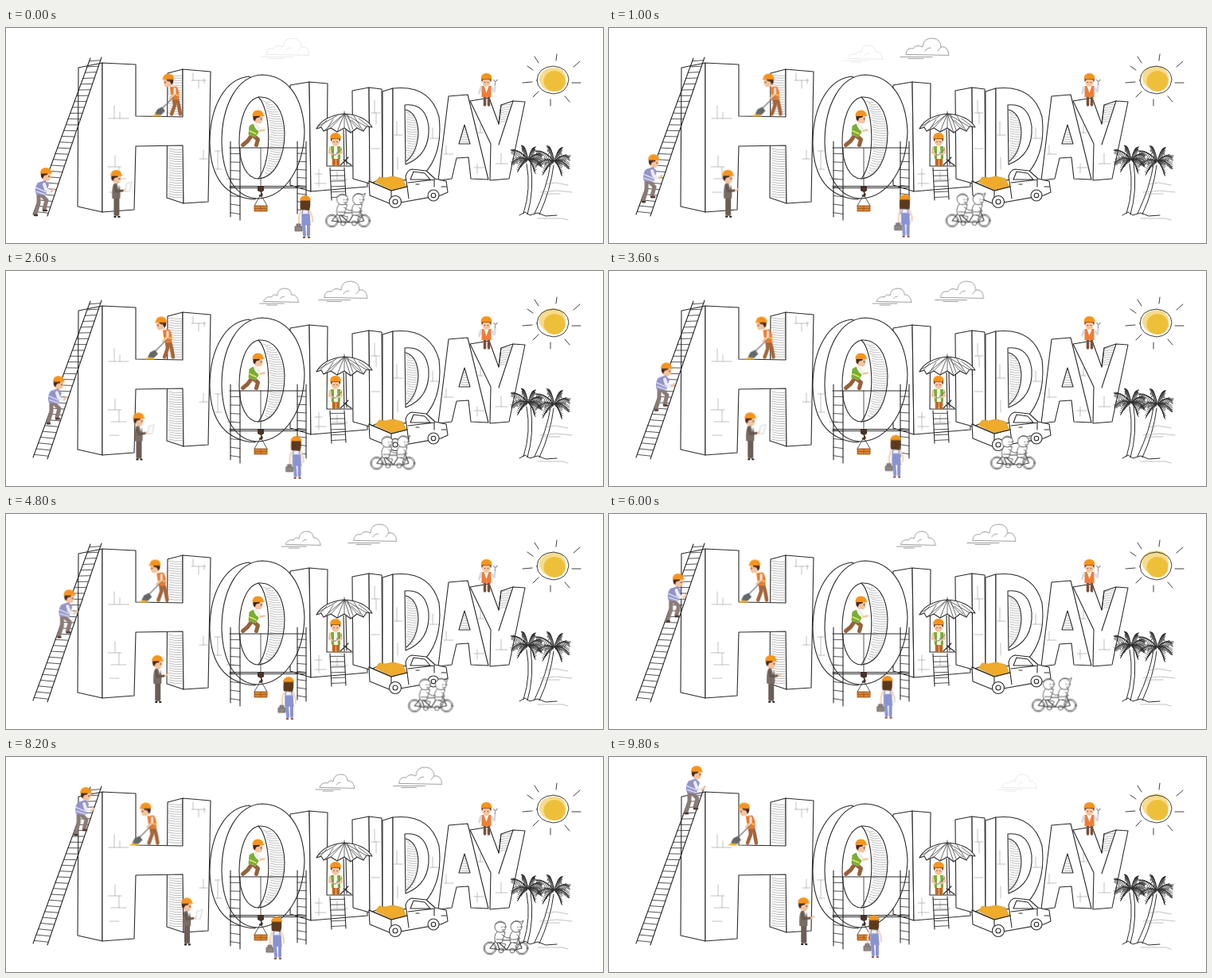
These frames come from a looping animation (750 px wide and 271 px high, 10000 ms). An HTML page:

```html
<!DOCTYPE html>
<html lang="en">
<head>
<meta charset="utf-8">
<title>Holiday</title>
<style>
html, body { margin: 0; width: 100%; height: 100%; overflow: hidden; background: #fff; }
svg { display: block; width: 100vw; height: 100vh; }
.ink { fill: none; stroke: #2b2b2b; stroke-width: 1.1; stroke-linecap: round; stroke-linejoin: round; }
.face { fill: #fff; }
.thin { stroke: #888; stroke-width: .55; }
.brick { stroke: #999; stroke-width: .6; }
.sketch { stroke: #444; stroke-width: .8; }
.cloud { stroke: #777; stroke-width: .7; }
.limb { fill: none; stroke-linecap: round; stroke-linejoin: round; }
.move { animation: 10s infinite; }
#climber { animation-name: climb; animation-timing-function: steps(50); }
#digger { animation-name: dig; animation-timing-function: steps(50); }
#planner { animation-name: plan; animation-timing-function: steps(50); }
#fitter { animation-name: fit; animation-timing-function: steps(50); }
#paper { animation-name: paper; animation-timing-function: step-end; }
#glow { animation-name: glow; animation-timing-function: steps(10); }
#bike { animation-name: ride; }
#cloudA { animation-name: driftA; }
#cloudB { animation-name: driftB; }
@keyframes climb { from { transform: translate(50px, 181px); } to { transform: translate(111.2px, 12.8px); } }
@keyframes dig { from { transform: translate(204px, 62.5px); } to { transform: translate(169.3px, 62.5px); } }
@keyframes plan { from { transform: translate(138.4px, 184px); } to { transform: translate(246.4px, 182px); } }
@keyframes fit { from { transform: translate(376px, 215px); } to { transform: translate(332px, 203px); } }
@keyframes paper { 0%, 26%, 66% { opacity: 1; } 6%, 46%, 86%, 100% { opacity: 0; } }
@keyframes glow {
  0%, 40%, 80% { transform: translate(687px, 65px); }
  20%, 60%, 100% { transform: translate(686px, 61px); }
}
@keyframes ride {
  0% { transform: translate(429.5px, 252px); animation-timing-function: steps(35); }
  70% { transform: translate(581px, 250px); animation-timing-function: steps(6); }
  82% { transform: translate(628px, 250px); opacity: 1; animation-timing-function: steps(5); }
  92%, 100% { transform: translate(668px, 249px); opacity: 0; }
}
@keyframes driftA {
  0% { transform: translate(354px, 0); opacity: .22; animation-timing-function: steps(5); }
  10% { transform: translate(400px, 0); opacity: 1; animation-timing-function: steps(37); }
  84% { transform: translate(524px, 0); opacity: 1; animation-timing-function: steps(6); }
  96%, 100% { transform: translate(600px, 0); opacity: 0; }
}
@keyframes driftB {
  0% { transform: translate(303px, 0); opacity: 0; animation-timing-function: steps(5); }
  10% { transform: translate(322px, 0); opacity: .22; animation-timing-function: steps(5); }
  20% { transform: translate(338px, 0); opacity: 1; animation-timing-function: steps(31); }
  82% { transform: translate(416px, 0); opacity: 1; animation-timing-function: steps(8); }
  98% { transform: translate(515px, 0); opacity: .22; }
  100% { transform: translate(524px, 0); opacity: 0; }
}
</style>
</head>
<body>
<svg viewBox="0 0 750 271" preserveAspectRatio="none">
  <defs>
    <path id="helmet" d="M-7 2.500Q-7-5 0-5 6-5 7 1L8.500 2.500Z" fill="#f7941d"/>
    <g id="head">
      <path d="M-5 1Q-6 8-3 11L3 12Q7 9 6 2Z" fill="#f6c39c"/>
      <path d="M-6 1Q-7 7-4 9L-2 5 2 4 3 1Z" fill="#4a2a1c"/>
      <path d="M4 5V7" stroke="#4a2a1c" stroke-width="1"/>
      <use href="#helmet"/>
    </g>
    <g id="front">
      <path d="M-6 1Q-6 11 0 12 6 11 6 1Z" fill="#f6c39c"/>
      <path d="M-6 1V6L-4 3H4L6 6V1Z" fill="#4a2a1c"/>
      <path d="M-2 6V7M2 6V7" stroke="#4a2a1c" stroke-width="1"/>
      <path d="M-7 2.500Q-7-5 0-5 7-5 7 2.500Z" fill="#f7941d"/>
    </g>
  </defs>

  <!-- clouds -->
  <path id="cloudA" class="move ink cloud" d="M-27 33Q-26 24-18 26-14 20-6 24-5 12 7 13 17 14 17 24 26 22 27 34ZM-34 36.500H6M-24 38.500H-5M-3 29Q-1 25 4 25M13 29L17 24"/>
  <path id="cloudB" class="move ink cloud" d="M-22 38Q-19 31-12 33-10 28-5 31-4 21 6 22 13 23 13 30 20 29 22 39ZM-27 41H4M-18 43H-5M-1 35Q1 32 4 32"/>

  <!-- sun -->
  <path id="glow" class="move" d="M-17-1Q-15-14 1-15 16-15 17 1 16 15 2 15-15 15-17-1Z" fill="#f6dc8d"/>
  <ellipse cx="689" cy="67" rx="13.500" ry="13" fill="#eec03a"/>
  <path class="ink" style="stroke-width:.9" d="M667 66Q668 49 688 48 706 50 707 65 705 82 688 83 668 81 667 66ZM692 33L691 41M721 42L713 49M664 36L669 44M655 48L662 53M711 69H722M649 69L661 68M662 87L669 80M684 90V98M702 86L708 93"/>

  <!-- letters -->
  <g class="ink">
    <path class="face" d="M222 52L203 57 202 214 223 221Z"/>
    <path class="face" d="M91 50L121 44 121 232 90 225Z"/>
    <path class="face" d="M121 44L163 46 163 111 222 112 222 52 257 55 254 219 223 221 222 148 163 149 161 229 121 232Z"/>
    <path class="face" d="M357 72L381 68 383 206 357 198Z"/>
    <path class="face" d="M381 68L404 70 403 174 453 174 454 200 383 206Z"/>
    <path class="face" d="M305 61C276 64 256 98 256 145 257 190 276 213 312 216L338 200V80Z"/>
    <path class="face" d="M322 59C290 60 271 98 271 144 272 186 288 215 318 215 352 212 374 175 375 130 373 86 353 60 322 59Z"/>
    <path class="face" d="M318 87C301 90 293 117 293 144 293 172 303 190 317 190 338 188 350 163 350 132 349 104 337 86 318 87Z"/>
    <path d="M317 87C332 101 336 165 317 190"/>
    <path class="face" d="M435 79L456 75 457 196 436 190Z"/>
    <path class="face" d="M456 75L472 77 473 190 457 196Z"/>
    <path class="face" d="M473 80L486 76 486 193 473 189Z"/>
    <path class="face" d="M486 76Q533 71 544 112 549 156 527 182 510 193 486 193Z"/>
    <path class="face" d="M501 97Q527 94 531 124 533 160 502 172Z"/>
    <path d="M502 103Q517 107 518 132 517 156 503 168"/>
    <path class="face" d="M556 86L580 84 606 191 584 190 581 163 566 164 560 190 543 192Z"/>
    <path class="face" d="M576 122L569 146H583Z"/>
    <path class="face" d="M583 92L607 88 619 121 622 97 637 92 652 93 632 190 608 192 609 146Z"/>
    <path d="M637 92L619 147M622 97L619 121"/>
  </g>
  <g id="hatching" class="ink thin"></g>
  <path class="ink brick" d="M136 98V114M129 114H154M143 106V114M128 175H145M137 161V175M132 190H151M142 175V190M130 207H142M235 66V57M233 66H251M242 66V76M249 70V64M243 165H253M248 154V165M262 155H270M266 155V178M261 178H271M277 190H286M388 184H397M393 178V200M388 196H402M416 181V191M410 191H429M463 91V107M459 107H470M465 107V121M459 152H470M491 118V135M487 135H498M492 163V178M536 126V139M532 139H543M553 148V159M550 159H562M596 118V132M590 132H600M592 171V183M588 176H601M622 158V171M615 171H630"/>

  <!-- ladders and scaffold -->
  <path class="ink" d="M106 38L34 235M120 37L52 237M407 176L409 217M425 176L427 216M281 151H376M281 199.500H376M281 201.500H376M282 143V238M294 151V242M366 143V234M377 143V236"/>
  <g id="rungs" class="ink" style="stroke-width:.8"></g>
  <path class="ink" style="stroke-width:.8" d="M320 151V201M320 210L312 224M320 210L328 224"/>
  <path d="M316 200H324V205L321 207Q325 211 320 213 317 212 318 210L320 211V207L316 205Z" fill="#4a3328"/>
  <path d="M312 224H328V231H312Z" fill="#d9822b" stroke="#8a4b18" stroke-width=".8"/>
  <path d="M312 227.500H328M320 224V231" stroke="#8a4b18" stroke-width=".6"/>

  <!-- worker inside the O -->
  <g transform="translate(316.500 108.500)">
    <path class="limb" stroke="#96613a" stroke-width="5" d="M-8 27L-13 34-19 39M-6 27L0 32-2 39"/>
    <path d="M-10 14L-2 11 4 18-3 29-12 26Z" fill="#eef0e6"/>
    <path d="M-11 15L-6 12-2 20 1 17 2 21-3 29-12 26Z" fill="#79ad35"/>
    <path d="M-11 21L-2 25" stroke="#e9e468" stroke-width="1.500"/>
    <path class="limb" stroke="#f3f3f3" stroke-width="3.500" d="M-3 15L2 21"/>
    <path class="limb" stroke="#f6c39c" stroke-width="2.500" d="M3 21L8 20"/>
    <use href="#head"/>
  </g>

  <!-- umbrella and worker -->
  <g class="ink">
    <path d="M424 128L425 173M427 128L428 172M424 166L434 173M420 173L430 163"/>
    <path class="face" d="M390 127Q398 111 425 108 451 110 460 125L453 124 449 130 441 126 433 132 425 126 416 131 408 126 399 130 396 125Z"/>
    <path class="sketch" d="M425 108L408 126M425 108L399 130M425 108L416 131M425 108L425 126M425 108L433 132M425 108L441 126M425 108L452 124M425 105V110M392 124L415 111M437 111L449 130M429 109L436 128M443 114L456 124M403 116L394 126M411 115L404 126M434 116L445 126"/>
  </g>
  <g transform="translate(414 137)">
    <path class="limb" stroke="#c2681f" stroke-width="4.500" d="M-2 27V35M3 27V35"/>
    <path d="M-6 12H6V28H-5Z" fill="#f7f4ea"/>
    <path d="M-6 12H-2L-2 28H-5ZM2 12H6L6 28H3Z" fill="#79ad35"/>
    <path class="limb" stroke="#f6c39c" stroke-width="2.500" d="M-7 14L-8 20-3 22M7 14L8 20 4 22"/>
    <path d="M-3 18A3 3 0 1 0 2 19M4 20L8 15" fill="none" stroke="#777"/>
    <use href="#front"/>
  </g>

  <!-- sitter -->
  <g transform="translate(603.500 62)">
    <path class="limb" stroke="#79513a" stroke-width="3.500" d="M-2 25V35M3 25V35"/>
    <path d="M-6 11H6V25H-6Z" fill="#fff"/>
    <path d="M-6 11H-3L0 20 3 11H6V25H-6Z" fill="#f07d36"/>
    <path class="limb" stroke="#d5dceb" stroke-width="2.800" d="M-7 13L-9 20M7 14L10 18 11 11"/>
    <path d="M11 10V7M9 3L11 6 14 3" fill="none" stroke="#999" stroke-width="1.300"/>
    <use href="#front"/>
  </g>

  <!-- truck -->
  <g class="ink">
    <path class="face" d="M456 193L484 205 504 200 502 187Q504 179 510 178L528 180 539 190 553 193 555 207 546 211 484 222 457 211Z"/>
    <path d="M464 194L469 188 477 189 486 187 498 190 503 200 484 204Z" fill="#efab2b" stroke="#d99a22" style="stroke-width:.8"/>
    <path d="M456 193L484 205V222M484 205L504 200"/>
    <path d="M508 191L512 181 526 183 533 191ZM504 200L506 215M505 195L539 191M538 191V200M547 200H553M515 197H519"/>
    <circle class="face" cx="489" cy="219" r="7.500"/><circle cx="489" cy="219" r="3"/>
    <circle class="face" cx="537" cy="211" r="7"/><circle cx="537" cy="211" r="2.800"/>
  </g>

  <!-- palms -->
  <path class="ink" style="stroke-width:1" d="M654 171Q660 203 650 234M659 170Q664 205 655 235M684 172Q680 200 664 234M688 173Q684 205 670 235M645 236L652 232 658 236 668 233 678 237 692 236"/>
  <path class="ink brick" d="M677 197L690 195 706 198M671 207L692 205 711 207M674 209H696M668 240H699L706 242"/>
  <g id="palms" class="ink" style="stroke-width:.75"></g>

  <!-- tandem -->
  <g id="bike" class="move"><g class="ink sketch">
    <circle cx="-20" cy="-9" r="8"/><circle cx="-20" cy="-9" r="6.500"/><circle cx="20" cy="-9" r="8"/><circle cx="20" cy="-9" r="6.500"/>
    <path style="stroke-width:1.200" d="M-20-9L-12-19H8L1-7-12-19-8-7H12L20-9 15-22 8-19M-20-9L-8-7"/>
    <path class="face" d="M-11-30Q-16-24-13-16L-5-16-1-29ZM8-30Q3-24 6-16L14-16 18-29Z"/>
    <path d="M-5-26L1-22 6-22M14-26L18-21 14-21M-9-16L0-14-4-6M10-16L17-13 12-6M-12-20H-4M6-20H14"/>
    <circle class="face" cx="-7" cy="-36" r="7"/><circle class="face" cx="13" cy="-36" r="7"/>
    <path d="M-13-39Q-8-44-1-40M7-39Q10-46 19-42L22-44 20-39M-5-36V-35M-2-36V-35M15-36V-35M18-36V-35M-5-32H-2M15-32H18"/>
    <circle cx="-6" cy="-6" r="3"/><circle cx="8" cy="-6" r="3"/>
  </g></g>

  <!-- moving workers -->
  <g id="climber" class="move">
    <path class="limb" stroke="#8b7b76" stroke-width="5" d="M-9 29L-9 40-13 53M-6 29L1 36-2 47"/>
    <path class="limb" stroke="#4a332c" stroke-width="2.500" d="M-14 55H-11M-3 49H1"/>
    <path d="M-10 14L-1 11 4 16 0 30-12 29Q-15 21-10 14Z" fill="#9293c9"/>
    <path d="M-13 20L1 26M-12 25L0 29" stroke="#d9daf1" stroke-width="1.500"/>
    <path class="limb" stroke="#eceef7" stroke-width="4" d="M-2 16L0 22 5 25"/>
    <path class="limb" stroke="#f6c39c" stroke-width="2.500" d="M7 25L10 22"/>
    <use href="#head"/>
  </g>
  <g id="digger" class="move">
    <path d="M-21 49Q-14 43-8 49Z" fill="#f2b01e"/>
    <path class="limb" stroke="#a5653a" stroke-width="4.500" d="M7 27L8 35 4 46M11 27L13 35 15 46"/>
    <path d="M2 12L10 11Q15 17 13 28L4 28Z" fill="#f07a2b"/>
    <path d="M3 22L14 22" stroke="#f9d35a" stroke-width="1.500"/>
    <path d="M9 22L-9 40" stroke="#777" stroke-width="1.300"/>
    <path d="M-8 37L-4 42-9 47-17 46-14 40Z" fill="#62676a"/>
    <path class="limb" stroke="#e9e9ee" stroke-width="3" d="M8 14L8 20"/>
    <path class="limb" stroke="#f6c39c" stroke-width="2.500" d="M7 22L2 26"/>
    <use href="#head" transform="scale(-1 1)"/>
  </g>
  <g id="planner" class="move">
    <path class="limb" stroke="#6b5e56" stroke-width="4" d="M-1 28L-1 51M2 28V51"/>
    <path d="M-3 12L3 11Q6 18 5 31L-5 31Q-6 19-3 12Z" fill="#7b6d63"/>
    <path d="M1 12L4 12 3 19Z" fill="#fff"/>
    <path class="limb" stroke="#65584f" stroke-width="3" d="M-2 15L0 22 8 21"/>
    <path class="limb" stroke="#f6c39c" stroke-width="2.300" d="M10 21L13 19"/>
    <path d="M-3 54H0M2 54H5" stroke="#30251f" stroke-width="2"/>
    <path id="paper" class="move" d="M13 12L20 10 17 22 11 22Z" fill="#fafafa" stroke="#ccc" stroke-width=".7"/>
    <use href="#head"/>
  </g>
  <g id="fitter" class="move">
    <path class="limb" stroke="#8a93d2" stroke-width="4" d="M-2 30L-1 46M4 30L4 46"/>
    <path d="M-5 14H6L6 32H-5Z" fill="#eeeff8"/>
    <path d="M-4 19L-3 13M4 19V13M-4 20H5L6 33H-4Z" fill="#8a93d2" stroke="#8a93d2" stroke-width="1.300"/>
    <path class="limb" stroke="#f6d6bd" stroke-width="2.300" d="M-6 16L-8 24-8 33M6 16L9 24V29"/>
    <path d="M-13 35H-4V41H-13ZM-11 35V32H-6V35" fill="#8f8884" stroke="#6a6460" stroke-width=".8"/>
    <path d="M-3 49H0M3 49H6" stroke="#8a5a3a" stroke-width="2"/>
    <path d="M-6 1Q-7 10-6 14L5 15Q7 9 6 1Z" fill="#5e3a1c"/>
    <path d="M-7 2.500Q-6-4 0-4 6-4 7 2.500Z" fill="#f7941d"/>
  </g>
</svg>
<script>
const byId = id => document.getElementById(id);
const draw = (id, d) => byId(id).insertAdjacentHTML('beforeend', `<path d="${d}"/>`);
const mix = (a, b, k) => a + (b - a) * k;

// Evenly spaced rungs between two rails given as [x, top, x, bottom].
function rungs([ax, ay, bx, by], [cx, cy, dx, dy], count) {
  let d = '';
  for (let i = 0; i < count; i++) {
    const k = (i + .5) / count;
    d += `M${mix(ax, bx, k)} ${mix(ay, by, k)}L${mix(cx, dx, k)} ${mix(cy, dy, k)}`;
  }
  draw('rungs', d);
}
rungs([106, 38, 34, 235], [120, 37, 52, 237], 27);
rungs([407, 176, 409, 217], [425, 176, 427, 216], 6);
rungs([282, 153, 282, 238], [294, 153, 294, 240], 8);
rungs([366, 153, 366, 234], [377, 153, 377, 236], 8);

// Bent strokes that fill a side wall; edges are functions of y.
function hatch(left, right, top, bottom, gap, bend) {
  let d = '';
  for (let y = top, i = 0; y < bottom; y += gap, i++) {
    const a = left(y) + i * 7 % 4 * .6, b = right(y);
    d += `M${a} ${y}Q${(a + b) / 2} ${y + bend} ${b} ${y + bend * .6}`;
  }
  draw('hatching', d);
}
const at = x => () => x;
const bow = (mid, half, x, r) => y => x + r * Math.sqrt(Math.max(0, 1 - ((y - mid) / half) ** 2));
hatch(at(204), at(221), 152, 213, 3, 2.5);
hatch(at(204), at(221), 59, 109, 3, 2);
hatch(bow(138, 51, 317, 14), bow(137, 50, 319, 30), 92, 185, 3, 3);
hatch(at(503), bow(135, 33, 503, 14), 106, 166, 3, 2);
hatch(y => 622 - (y - 97) * .12, y => 636 - (y - 94) * .35, 98, 121, 3, -2);
hatch(y => 575 - (y - 123) * .25, y => 577 + (y - 123) * .2, 128, 145, 3, 1);

// Arching ribs, each with leaflets swept outward and down.
let seed = 7;
const random = () => (seed = seed * 16807 % 2147483647) / 2147483647;
const ribs = [[-21, -11], [-21, 5], [-13, 15], [-7, -17], [8, -15], [17, -4], [17, 8], [8, 16]];
function palm(x, y, scale) {
  let d = '';
  for (const [dx, dy] of ribs) {
    const ex = dx * scale, ey = dy * scale;
    for (let k = .05; k < 1; k += .08) {
      const px = x + ex * k, py = y + ey * k - 16 * k * (1 - k);
      const leaf = (2 + 4 * Math.sin(k * 3)) * mix(.6, 1.2, random());
      d += `M${px} ${py}l${ex * .09} ${ey * .09 + 2 * k - 1}M${px} ${py}l${Math.sign(dx) * leaf * .5} ${leaf}`;
      d += `M${px} ${py}l${Math.sign(dx) * leaf * .7} ${-leaf * .35}`;
    }
  }
  draw('palms', d);
}
palm(656, 166, 1);
palm(689, 168, 1.1);
</script>
</body>
</html>
```
